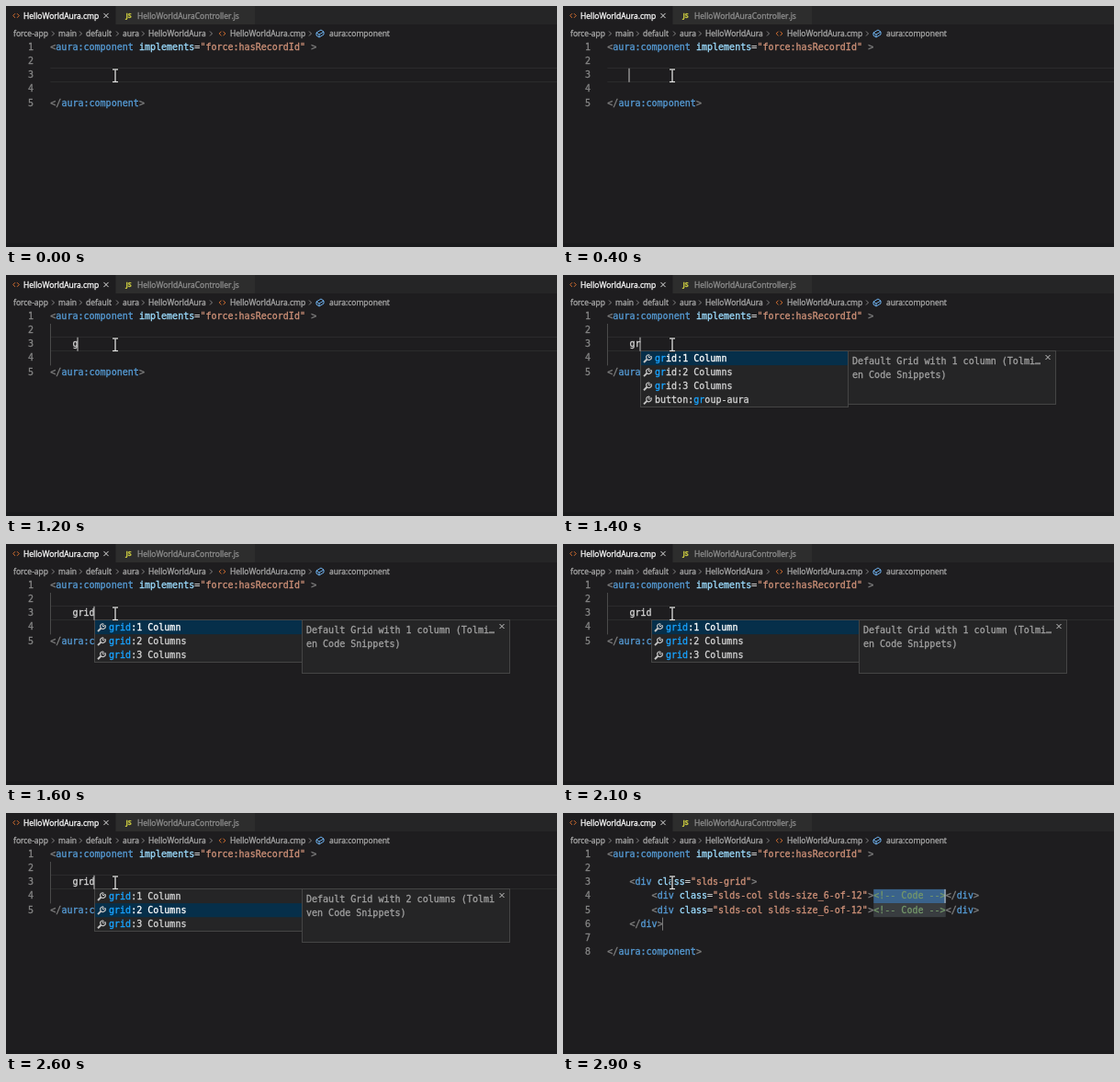
An HTML page with a canvas for the animation above (3000 ms loop, 600 by 262 pixels).

```html
<!DOCTYPE html>
<html lang="en">
<head>
<meta charset="utf-8">
<title>Code editor completion</title>
<style>
  html, body { margin: 0; width: 100%; height: 100%; overflow: hidden; background: #1e1d1f; }
  canvas { display: block; }
</style>
</head>
<body>
<canvas id="stage" width="600" height="262"></canvas>
<script>
const g = document.getElementById("stage").getContext("2d");
const MONO = '10.03px "DejaVu Sans Mono", monospace';
const UI = '8.5px "Open Sans", sans-serif';
const CHAR = 6.04, LEFT = 48.3, ROW = 15.13;
const GRAY = "#808080", BLUE = "#569cd6", LIGHT = "#d4d4d4", ORANGE = "#d9702f";

const colX = n => LEFT + n * CHAR;
const baseY = line => 48 + (line - 1) * ROW;

function rect(x, y, w, h, color) {
  g.fillStyle = color;
  g.fillRect(x, y, w, h);
}

// A thin outline gives the slightly heavy weight of the editor's type
function text(s, x, y, color, font = MONO) {
  g.font = font;
  g.fillStyle = g.strokeStyle = color;
  g.lineWidth = .3;
  g.fillText(s, x, y);
  g.strokeText(s, x, y);
}

function path(points, color, width = 1) {
  g.strokeStyle = color;
  g.lineWidth = width;
  g.beginPath();
  points.forEach(([x, y], i) => i ? g.lineTo(x, y) : g.moveTo(x, y));
  g.stroke();
}

function box(x, y, w, h) {
  rect(x, y, w, h, "#454545");
  rect(x + 1, y + 1, w - 2, h - 2, "#252526");
}

function cross(x, y, r, color) {
  path([[x - r, y - r], [x + r, y + r]], color);
  path([[x - r, y + r], [x + r, y - r]], color);
}

function angles(x, y) {
  path([[x - 1, y - 2.3], [x - 3.3, y], [x - 1, y + 2.3]], ORANGE);
  path([[x + 1, y - 2.3], [x + 3.3, y], [x + 1, y + 2.3]], ORANGE);
}

function cube(x, y) {
  const c = "#75beff";
  path([[x - 4, y - 1], [x + 1, y - 4], [x + 4, y - 2], [x + 4, y + 1],
        [x - 1, y + 4], [x - 4, y + 2], [x - 4, y - 1], [x - 1, y + 1], [x + 4, y - 2]], c, .9);
  path([[x - 1, y + 1], [x - 1, y + 4]], c, .9);
}

function wrench(x, y) {
  g.strokeStyle = "#c5c5c5";
  g.lineWidth = 1.1;
  g.beginPath();
  g.arc(x + 1.5, y - 1.5, 2.8, -.5, 4.9);
  g.stroke();
  path([[x + 4, y - 3], [x + 2, y - 1], [x + 1, y - 2], [x + 2.5, y - 4.2]], "#c5c5c5");
  path([[x - .5, y + .5], [x - 4, y + 4]], "#c5c5c5", 2);
}

// Colours one line of markup, token by token
function markup(line, col, source) {
  let last = "";
  for (const token of source.match(/<!--.*?-->|<\/?|>|=|"[^"]*"|[\w:]+|\s+/g)) {
    const color = token.startsWith("<!--") ? "#74976a"
      : /^[<>]/.test(token) ? GRAY
      : token[0] === '"' ? "#ce9178"
      : token === "=" ? LIGHT
      : last[0] === "<" ? BLUE : "#9cdcfe";
    text(token, colX(col), baseY(line), color);
    col += token.length;
    last = token;
  }
}

function header() {
  rect(0, 0, 600, 262, "#1e1d1f");
  rect(0, 258, 600, 4, "#1a1a1c");
  rect(119, 0, 481, 20, "#252526");
  rect(120, 0, 151, 20, "#2d2d2d");
  angles(11, 10.5);
  text("HelloWorldAura.cmp", 19, 14, "#ffffff", UI);
  cross(109, 10.5, 2.6, "#dddddd");
  text("JS", 130.5, 13, "#cbcb41", 'bold 7px "Open Sans", sans-serif');
  text("HelloWorldAuraController.js", 143, 14, "#8f8f8f", UI);

  const crumbs = [["force-app", 8], ["main", 57], ["default", 87], ["aura", 127],
    ["HelloWorldAura", 155], ["HelloWorldAura.cmp", 244], ["aura:component", 352]];
  for (const [s, x] of crumbs) text(s, x, 33, "#a9a9a9", UI);
  for (const x of [51, 81, 121, 149, 223, 331])
    path([[x - 1, 27.5], [x + 1.5, 30], [x - 1, 32.5]], "#909090", .9);
  angles(235.5, 30);
  cube(342, 30);
}

function gutter(count) {
  g.textAlign = "right";
  for (let n = 1; n <= count; n++) text(n, 30, baseY(n), "#858585");
  g.textAlign = "left";
}

function caret(line, col) {
  rect(Math.floor(colX(col)) - .5, baseY(line) - 10.5, 1, 15, "#c8c8c8");
}

function popup(typed, chosen) {
  const x = Math.floor(colX(4 + typed.length));
  const items = ["grid:1 Column", "grid:2 Columns", "grid:3 Columns"];
  if (typed === "gr") items.push("button:group-aura");
  box(x, 82, 227, Math.round(items.length * ROW + 1.5));
  items.forEach((item, i) => {
    const y = 83 + i * ROW, at = item.indexOf(typed);
    if (i === chosen) rect(x + 1, y, 225, ROW, "#062f4a");
    wrench(x + 8, y + 8);
    text(item.slice(0, at), x + 16, y + 11, LIGHT);
    text(typed, x + 16 + at * CHAR, y + 11, "#18a3ff");
    text(item.slice(at + typed.length), x + 16 + (at + typed.length) * CHAR, y + 11,
      i === chosen ? "#ffffff" : LIGHT);
  });

  box(x + 226, 82, 227, 59);
  const notes = chosen
    ? ["Default Grid with 2 columns (Tolmi", "ven Code Snippets)"]
    : ["Default Grid with 1 column (Tolmi…", "en Code Snippets)"];
  notes.forEach((s, i) => text(s, x + 231, 97 + i * ROW, "#a0a0a0"));
  cross(x + 444, 89.5, 2.5, "#c5c5c5");
}

function pointer() {
  const x = 119;
  for (const [color, w] of [["#111111", 3], ["#e4e4e4", 1.3]]) {
    path([[x, 69.5], [x, 82.5]], color, w);
    for (const y of [69, 82.5]) path([[x - 3, y], [x + 3, y]], color, w);
  }
}

function draw(t) {
  const done = t >= 2700;
  const typed = t < 1200 ? "" : t < 1300 ? "g" : t < 1500 ? "gr" : t < 1600 ? "gri" : "grid";
  const caretOn = t >= 100 && t < 600 || t >= 1000 && t < 2100 || t >= 2600;

  header();
  gutter(done ? 8 : 5);
  markup(1, 0, '<aura:component implements="force:hasRecordId" >');
  markup(done ? 8 : 5, 0, "</aura:component>");

  if (done) {
    const cell = '<div class="slds-col slds-size_6-of-12"><!-- Code --></div>';
    rect(colX(48), baseY(4) - 10.5, 13 * CHAR, ROW, "#3a638b");
    rect(colX(48), baseY(5) - 10.5, 13 * CHAR, ROW, "#393d40");
    markup(3, 4, '<div class="slds-grid">');
    markup(4, 8, cell);
    markup(5, 8, cell);
    markup(6, 4, "</div>");
    rect(108, baseY(6) - 10, 1, 14, "#777777");
    if (caretOn) caret(4, 61);
  } else {
    for (const y of [67, 82]) rect(LEFT, y, 600 - LEFT, 1, "#2b2b2c");
    if (typed) rect(48, 53, 1, 3 * ROW, "#4a4a4a"); // indent guide
    text(typed, colX(4), baseY(3), LIGHT);
    if (typed.length > 1) popup(typed, t < 2400 ? 0 : 1);
    if (caretOn) caret(3, 4 + typed.length);
  }
  pointer();
}

function tick() {
  draw(performance.now() % 3000);
  requestAnimationFrame(tick);
}
tick();
</script>
</body>
</html>
```
